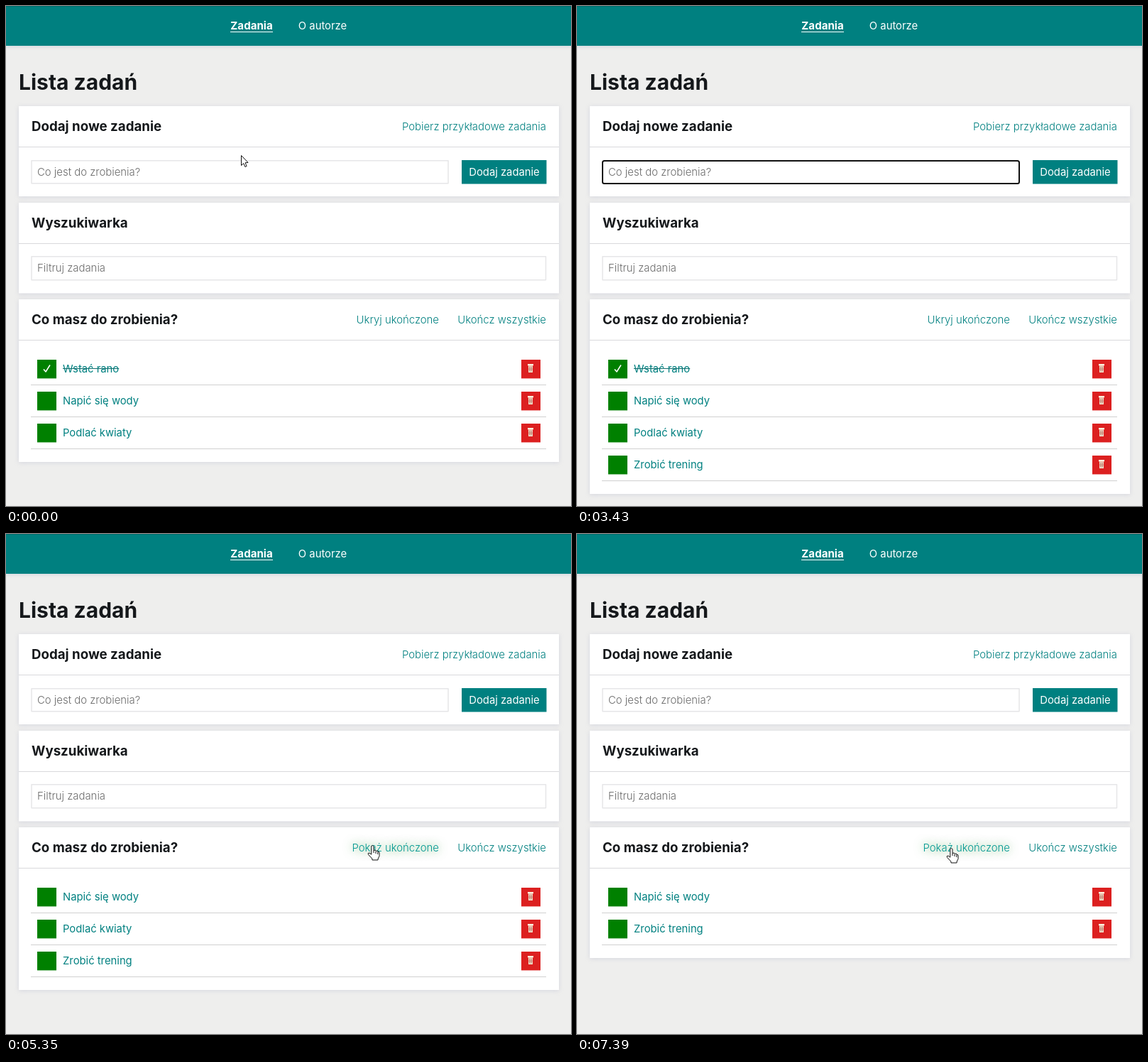
Animation, 796 px wide and 704 px high, one loop 8000 ms. Source, as an HTML page with a canvas:

```html
<!DOCTYPE html>
<html lang="pl">
<head>
<meta charset="utf-8">
<title>Lista zadań</title>
<style>
  html, body { margin: 0; width: 100%; height: 100%; overflow: hidden; background: #eee; }
  canvas { display: block; }
</style>
</head>
<body>
<canvas id="stage" width="796" height="704"></canvas>
<script>
const ctx = document.getElementById('stage').getContext('2d');
const LOOP = 8000;
const TEAL = '#008080', HOVER = '#009892', INK = '#15181b', GREY = '#6c6c6c', LINE = '#d9d9dc';
const BODY = '400 14.8px Inter, sans-serif';
const LIGHT = '300 14.9px Inter, sans-serif';
const HEAD = '700 18.7px Inter, sans-serif';
const NEW_TASK = 'Zrobić trening';

const T = {
  focus: 470, type: 920, submit: 1770, grow: 1840, grown: 2040,
  blur: 5000, hide: 5140, check: 6260
};

// Pointer hotspot: time, x, y
const PATH = [
  [0, 331, 210], [70, 331, 210], [190, 322, 230], [1280, 322, 230],
  [1700, 374, 496], [2840, 374, 496], [3130, 454, 598], [4370, 454, 598],
  [4970, 516, 439], [5350, 516, 439], [6130, 53, 557], [6330, 53, 557],
  [6820, 332, 495], [7390, 527, 443], [LOOP, 527, 443]
];

const clamp = v => Math.min(1, Math.max(0, v));
const ramp = (t, a, b) => clamp((t - a) / (b - a));
const smooth = k => k * k * (3 - 2 * k);
const inside = (p, x, y, w, h) => p.x >= x && p.x <= x + w && p.y >= y && p.y <= y + h;

function rect(x, y, w, h, color) {
  ctx.fillStyle = color;
  ctx.fillRect(x, y, w, h);
}

function text(str, x, y, font, color, align = 'left') {
  ctx.font = font;
  ctx.fillStyle = color;
  ctx.textAlign = align;
  ctx.fillText(str, x, y);
}

function shadow(color, blur, y = 0) {
  ctx.shadowColor = color;
  ctx.shadowBlur = blur;
  ctx.shadowOffsetY = y;
}

function card(y, bottom, title) {
  ctx.save();
  shadow('rgba(165,170,195,.35)', 6, 1);
  rect(18, y, 761, bottom - y, '#fff');
  ctx.restore();
  rect(18, y + 57, 761, 1, LINE);
  text(title, 36, y + 35, HEAD, INK);
}

function field(y, w, h) {
  ctx.strokeStyle = '#e6e6e8';
  ctx.lineWidth = 1.5;
  ctx.strokeRect(36, y + .75, w, h - 1.5);
}

function pointerAt(t) {
  const i = PATH.findIndex((k, n) => n && t <= k[0]);
  const a = PATH[i - 1], b = PATH[i];
  const k = smooth(ramp(t, a[0], b[0]));
  return { x: a[1] + (b[1] - a[1]) * k, y: a[2] + (b[2] - a[2]) * k };
}

function rowsAt(t) {
  return [
    { name: 'Wstać rano', done: true, size: 1 - ramp(t, T.hide - 70, T.hide + 70) },
    { name: 'Napić się wody', size: 1 },
    { name: 'Podlać kwiaty', done: t > T.check, size: 1 - ramp(t, T.check, T.check + 140) },
    { name: NEW_TASK, size: ramp(t, T.grow, T.grown) }
  ].filter(row => row.size > 0);
}

const rowHeight = row => 27.2 + 18 * row.size;

function drawCheck(x, y) {
  ctx.strokeStyle = '#fff';
  ctx.lineWidth = 1.5;
  ctx.beginPath();
  ctx.moveTo(x - 4.5, y + 1);
  ctx.lineTo(x - 1.5, y + 4.5);
  ctx.lineTo(x + 4.5, y - 5);
  ctx.stroke();
}

function drawBin(x, y) {
  rect(x - 4, y - 6, 8, 2.4, '#fff3dc');
  rect(x - 3, y - 3.6, 6, 9.6, '#f4e5cf');
  for (const dx of [-1.5, 0, 1.5]) rect(x + dx - .35, y - 2.5, .7, 7, '#b66457');
  rect(x - 3, y + .8, 6, .6, '#b66457');
}

function drawRow(row, top) {
  const y = Math.round(top + 9 * row.size);
  ctx.save();
  ctx.globalAlpha = row.size;
  rect(44, y, 27, 26.4, '#008000');
  rect(726, y, 27, 26.4, '#dc2020');
  drawBin(739, y + 12);
  if (row.done) drawCheck(57.5, y + 12.5);
  text(row.name, 80, y + 17.5, BODY, TEAL);
  if (row.done) rect(80, y + 12, ctx.measureText(row.name).width, 1, '#126f6f');
  rect(35, Math.round(top + rowHeight(row)) - 1, 726, 1, '#d0d0d0');
  ctx.restore();
}

function outline(points, x, y) {
  ctx.beginPath();
  points.forEach(([px, py]) => ctx.lineTo(x + px, y + py));
  ctx.closePath();
  ctx.fillStyle = '#fff';
  ctx.strokeStyle = '#111';
  ctx.lineWidth = 1;
  ctx.lineJoin = 'round';
  ctx.fill();
  ctx.stroke();
}

function drawArrow(x, y) {
  outline([[.5, .5], [.5, 14.5], [3.7, 11.6], [5.9, 16.5], [8.1, 15.5], [6, 10.8], [10, 10.4]], x, y);
}

function drawHand(x, y) {
  outline([[-1.2, .3], [.4, -.5], [2, .6], [2, 6.5], [4.2, 6], [5.4, 7.3], [7.4, 7], [8.2, 8.5],
    [9.6, 8.6], [10, 10], [10, 14.5], [8.2, 18], [8, 20], [0, 20], [-.2, 18],
    [-5.5, 12.5], [-5.8, 10.6], [-4, 10], [-1.2, 12.2]], x, y);
  ctx.beginPath();
  for (const [dx, dy] of [[2, 6.5], [5, 7.5], [7.8, 8.5]]) {
    ctx.moveTo(x + dx, y + dy);
    ctx.lineTo(x + dx, y + dy + 3.5);
  }
  ctx.stroke();
}

function drawBeam(x, y) {
  x = Math.round(x);
  y = Math.round(y);
  rect(x, y - 6, 1, 13, '#222');
  for (const dy of [-7, 7]) {
    rect(x - 3, y + dy, 3, 1, '#222');
    rect(x + 1, y + dy, 3, 1, '#222');
  }
}

function drawPointer(p, rows) {
  const onField = inside(p, 36, 217, 588, 33) || inside(p, 36, 352, 726, 34);
  const onLink = inside(p, 486, 432, 125, 20);
  const onRow = rows.some((_, i) => {
    const y = 498 + i * 45.2;
    return inside(p, 44, y, 27, 27) || inside(p, 80, y + 4, 104, 19);
  });
  (onField ? drawBeam : onLink || onRow ? drawHand : drawArrow)(p.x, p.y);
}

function caretOn(t) {
  if (t < T.type) return t < T.focus + 430;
  if (t < 1840) return true;
  return Math.floor((t - 1840) / 530) % 2 === 0;
}

function drawEntry(t) {
  const focused = t >= T.focus && t < T.blur;
  const typed = t >= T.type && t < T.submit
    ? NEW_TASK.slice(0, 1 + Math.floor((t - T.type) / 58)) : '';
  if (focused) {
    ctx.strokeStyle = '#101010';
    ctx.lineWidth = 2;
    ctx.beginPath();
    ctx.roundRect(36, 218, 587, 32, 2.5);
    ctx.stroke();
  } else {
    field(217, 587, 33.5);
  }
  text(typed || 'Co jest do zrobienia?', 44, 238.5, LIGHT, typed ? '#222' : GREY);
  if (focused && caretOn(t)) {
    const x = typed ? 44 + Math.ceil(ctx.measureText(typed).width) : 44;
    rect(x, 226, 1, 16, '#000');
  }
}

function drawHeader() {
  ctx.save();
  shadow('rgba(150,165,190,.4)', 5, 1);
  rect(0, 0, 796, 56, TEAL);
  ctx.restore();
  rect(0, 0, 796, 1, '#006c6c');
  text('Zadania', 346, 33, '700 15.1px Inter, sans-serif', '#fff', 'center');
  rect(316, 36, 60, 1, '#fff');
  text('O autorze', 446, 33, BODY, '#fff', 'center');
}

function drawToggle(t, p) {
  const hidden = t >= T.hide;
  ctx.save();
  if (hidden) shadow('rgba(0,128,0,.75)', 14);
  text(hidden ? 'Pokaż ukończone' : 'Ukryj ukończone', 610, 446.5, LIGHT,
    inside(p, 486, 432, 125, 20) ? HOVER : TEAL, 'right');
  ctx.restore();
}

function draw(t) {
  const p = pointerAt(t);
  const rows = rowsAt(t);
  const listTop = 488.6;
  const listBottom = rows.reduce((y, row) => y + rowHeight(row), listTop);

  rect(0, 0, 796, 704, '#eeeeed');
  drawHeader();
  text('Lista zadań', 18, 118, '700 30px Inter, sans-serif', INK);

  card(141, 268, 'Dodaj nowe zadanie');
  text('Pobierz przykładowe zadania', 761, 174.5, LIGHT, TEAL, 'right');
  drawEntry(t);
  rect(642, 217, 119.5, 33.5, TEAL);
  text('Dodaj zadanie', 702, 238.5, BODY, '#fff', 'center');

  card(277, 404.5, 'Wyszukiwarka');
  field(352, 724.5, 34.5);
  text('Filtruj zadania', 44, 374, LIGHT, GREY);

  card(413, Math.round(listBottom + 18), 'Co masz do zrobienia?');
  drawToggle(t, p);
  text('Ukończ wszystkie', 761, 446.5, LIGHT, TEAL, 'right');

  let y = listTop;
  for (const row of rows) {
    drawRow(row, y);
    y += rowHeight(row);
  }

  const away = t >= 3160 && t < 4370;
  if (!away) drawPointer(p, rows);
}

const start = performance.now();
function frame() {
  draw((performance.now() - start) % LOOP);
  requestAnimationFrame(frame);
}
frame();
</script>
</body>
</html>
```
